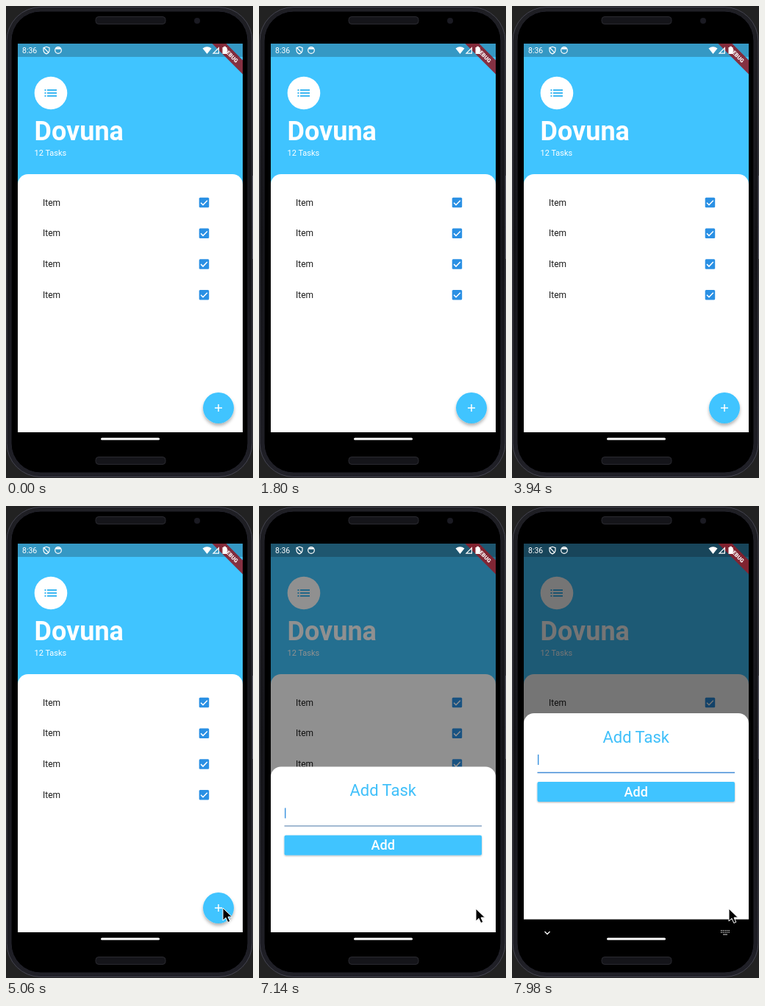
An HTML page that plays this animation: 336x640 px, repeating every 8 s.

```html
<!DOCTYPE html>
<html lang="en">
<head>
<meta charset="utf-8">
<title>Task list</title>
<style>
  html, body { margin: 0; width: 100%; height: 100%; overflow: hidden; background: #222; }
  svg { display: block; width: 336px; height: 640px; font-family: Roboto, sans-serif; }
</style>
</head>
<body>
<svg viewBox="0 0 336 640">
  <defs>
    <clipPath id="screen"><rect x="16" y="51" width="306" height="527"/></clipPath>
    <filter id="shadow" x="-30%" y="-30%" width="160%" height="180%">
      <feDropShadow dx="0" dy="3" stdDeviation="2" flood-color="#000" flood-opacity=".3"/>
    </filter>
    <filter id="low-shadow" x="-5%" y="-20%" width="110%" height="150%">
      <feDropShadow dx="0" dy="1" stdDeviation=".8" flood-color="#000" flood-opacity=".3"/>
    </filter>
    <linearGradient id="body" x2="0" y2="1">
      <stop offset="0" stop-color="#1f1f24"/>
      <stop offset=".5" stop-color="#131317"/>
      <stop offset="1" stop-color="#202027"/>
    </linearGradient>
  </defs>

  <!-- phone -->
  <rect x="1" y="1.5" width="334" height="637" rx="46" fill="url(#body)" stroke="#44444f"/>
  <rect x="7" y="7" width="322" height="626" rx="40" fill="#000" stroke="#22222b"/>
  <path d="M335.5 230V343" stroke="#555560"/>
  <g fill="#15151a" stroke="#2a2a30">
    <rect x="122" y="14.5" width="95" height="10" rx="4"/>
    <rect x="122" y="611.5" width="95" height="10" rx="4"/>
  </g>
  <circle cx="260" cy="20" r="4" fill="#1a1a22"/>
  <rect x="129" y="585.5" width="80" height="3" rx="1.5" fill="#fff"/>

  <g clip-path="url(#screen)">
    <!-- task page -->
    <rect x="16" y="51" width="306" height="527" fill="#40c4ff"/>
    <rect x="16" y="51" width="306" height="18" fill="#3598c4"/>
    <circle cx="61" cy="118" r="22.3" fill="#fff"/>
    <path d="M52.5 114h2m1.5 0h13m-16.5 4h2m1.5 0h13m-16.5 4h2m1.5 0h13" stroke="#40b8f2" stroke-width="1.8"/>
    <g fill="#fff">
      <text x="38.5" y="182" font-size="36" font-weight="700">Dovuna</text>
      <text x="38.5" y="202.5" font-size="11">12 Tasks</text>
      <path d="M16 578V242a14 14 0 0 1 14-14H308a14 14 0 0 1 14 14V578z"/>
    </g>
    <g id="items"></g>
    <circle cx="289" cy="545" r="21" fill="#40c4ff" filter="url(#shadow)"/>
    <path d="M284 545h10m-5-5v10" stroke="#fff" stroke-width="1.5"/>
    <rect id="scrim" x="16" y="51" width="306" height="527"/>

    <!-- add sheet, drawn from its own top edge -->
    <g id="sheet">
      <path d="M16 310V14a14 14 0 0 1 14-14H308a14 14 0 0 1 14 14V310z" fill="#fff"/>
      <text x="168.7" y="40" font-size="22" text-anchor="middle" fill="#40c0fa">Add Task</text>
      <path d="M35.7 56v14" stroke="#4297e0" stroke-width="1.5"/>
      <path id="line" d="M34.5 80.5H303"/>
      <rect x="34.5" y="93" width="268.5" height="27" rx="2" fill="#40c4ff" filter="url(#low-shadow)"/>
      <text x="168.7" y="112.7" font-size="18" font-weight="500" text-anchor="middle" fill="#fff">Add</text>
    </g>

    <!-- debug ribbon -->
    <g transform="translate(306 67) rotate(45)">
      <rect x="-35" y="-6.7" width="70" height="13.4" fill="#8f1d28" opacity=".88"/>
      <text y="2.7" font-size="7.5" font-weight="800" text-anchor="middle" fill="#fff">DEBUG</text>
    </g>

    <!-- status bar -->
    <g fill="#fff">
      <text x="22" y="64" font-size="10.5">8:36</text>
      <path d="M267.5 57.5Q273.5 53 279.5 57.5L273.5 65z"/>
      <path d="M294.5 56h1.5v-1.3h3V56h1.5v9h-6z"/>
    </g>
    <g fill="none" stroke="#fff" stroke-width="1.2">
      <path d="M282 64.2H289.4V56.8z"/>
      <path d="M55 55.3l4 1.4v3q0 3.6-4 5.2-4-1.6-4-5.2v-3zM52 57l6 6.3"/>
      <circle cx="71" cy="60" r="4.3"/>
      <path d="M67.5 57.6h7" stroke-width="2.2"/>
    </g>
  </g>

  <!-- input strip -->
  <g id="strip">
    <rect x="16" y="560.5" width="306" height="18.5" fill="#000"/>
    <g fill="none" stroke="#fff">
      <path d="M44.5 577l3.5 3.5 3.5-3.5" stroke-width="1.3"/>
      <path d="M284 575.6h12m-12 2.5h12" stroke-width="1.3" stroke-dasharray="1.4 1.2" opacity=".85"/>
      <path d="M287 581h6" opacity=".85"/>
    </g>
  </g>

  <path id="pointer" d="M0 0V17l4-3.8 2.8 6.3 3-1.3L7 12h5.5z" fill="#000" stroke="#fff" stroke-width="1"/>
</svg>

<script>
const LOOP = 8000;
const el = id => document.getElementById(id);

el("items").innerHTML = [0, 1, 2, 3].map(i => `
  <g transform="translate(0 ${266.5 + i * 41.7})">
    <text x="50" y="4.2" font-size="12" fill="#1c1c1c">Item</text>
    <rect x="262.7" y="-6.7" width="13.5" height="13.5" rx="1.5" fill="#2a90e4"/>
    <path d="M265 .2l3 3 5.8-6" fill="none" stroke="#fff" stroke-width="1.5"/>
  </g>`).join("");

// Each row: time, then the values reached at that time.
const POINTER = [
  [4900, 338, 585], [5040, 295, 545], [5700, 295, 546], [5860, 338, 585],
  [6560, 338, 585], [6720, 295, 546]
];
const LINE = [[7036, 140, 150, 165, 1], [7290, 66, 140, 214, 1.7]];
const SHEET_START = 7036, SHEET_TIME = 250, SHEET_HEIGHT = 279;
const STRIP_START = 7480, STRIP_TIME = 120, STRIP_HEIGHT = 18;
const SCRIM_OPACITY = .54;

const clamp = x => Math.min(1, Math.max(0, x));
const easeOut = x => 1 - (1 - clamp(x)) ** 3;

function sample(rows, t) {
  const i = rows.findIndex(row => row[0] > t);
  if (i === 0) return rows[0].slice(1);
  if (i < 0) return rows[rows.length - 1].slice(1);
  const a = rows[i - 1], b = rows[i];
  const k = (t - a[0]) / (b[0] - a[0]);
  return a.slice(1).map((v, j) => v + (b[j + 1] - v) * k);
}

function draw(t) {
  const open = easeOut((t - SHEET_START) / SHEET_TIME);
  const lift = easeOut((t - STRIP_START) / STRIP_TIME);
  const top = 578 - SHEET_HEIGHT * open - STRIP_HEIGHT * lift;
  el("sheet").setAttribute("transform", `translate(0 ${top})`);
  el("sheet").style.display = open ? "" : "none";
  el("scrim").setAttribute("opacity", SCRIM_OPACITY * open);

  const [r, g, b, width] = sample(LINE, t);
  el("line").setAttribute("stroke", `rgb(${r},${g},${b})`);
  el("line").setAttribute("stroke-width", width);

  el("strip").setAttribute("transform", `translate(0 ${STRIP_HEIGHT * (1 - lift)})`);
  el("strip").setAttribute("opacity", lift);

  const [x, y] = sample(POINTER, t);
  el("pointer").setAttribute("transform", `translate(${x} ${y})`);
}

function tick() {
  draw(performance.now() % LOOP);
  requestAnimationFrame(tick);
}
tick();
</script>
</body>
</html>
```
